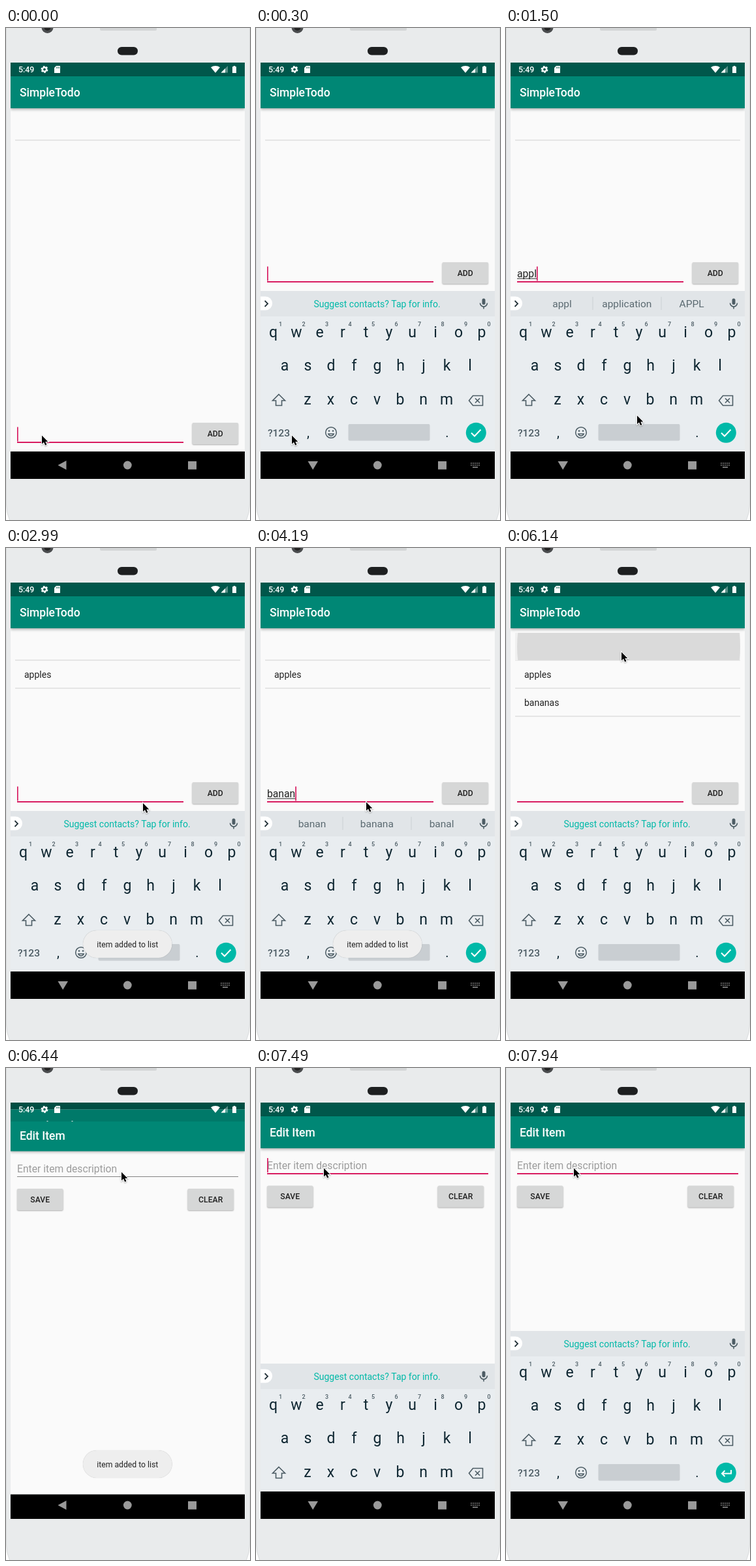
Recreate the animation shown at these times as an HTML page with a canvas. Size 374 by 754 pixels, loop 8000 ms.

```html
<!DOCTYPE html>
<html>
<head>
<meta charset="utf-8">
<style>
html, body { margin: 0; width: 100%; height: 100%; overflow: hidden; background: #fff; }
canvas { display: block; }
</style>
</head>
<body>
<canvas id="stage" width="374" height="754"></canvas>
<script>
const ctx = document.getElementById('stage').getContext('2d');
const LOOP = 8000;
const PINK = '#d81b60', TEAL = '#00b9a8', BAR = '#008775', STATUS = '#00574b';
const INK = '#0e2631', SLATE = '#4c5c64', NAV_GRAY = '#999';
const PROMPT = 'Suggest contacts? Tap for info.';

// Pointer stops: step, x, y
const POINTER = [
  [0, 54, 623], [3, 54, 623], [5, 200, 592.5], [13, 200, 592.5], [16, 330, 376.5], [18, 330, 376.5],
  [20, 209, 389.5], [21, 157, 383], [22, 168, 388], [31, 168, 388], [34, 330, 376.5], [36, 330, 376.5],
  [38, 176, 158], [46, 176, 158], [49, 103, 152], [53, 103, 152]
];
const WORDS = [
  { word: 'apples', start: 7, sent: 18, hints: ['I and', 'app April', 'apple application', 'application APPL', 'apples applet', "apple's apple"] },
  { word: 'bananas', start: 24, sent: 36, hints: ['but be', 'bad back', 'band bank', 'banana band', 'banana banal', 'bananas banana', "banana's bandanas"] }
];
const CARET_OFF = [[5, 6], [15, 17], [21, 23], [34, 35], [39, 42], [53, 53]];

const within = (n, a, b) => n >= a && n <= b;

function rect(x, y, w, h, color, r = 0) {
  ctx.fillStyle = color;
  ctx.beginPath();
  ctx.roundRect(x, y, w, h, r);
  ctx.fill();
}

function disc(x, y, r, color) {
  ctx.fillStyle = color;
  ctx.beginPath();
  ctx.arc(x, y, r, 0, 7);
  ctx.fill();
}

function fill(d, color) {
  ctx.fillStyle = color;
  ctx.fill(new Path2D(d));
}

function line(d, color, width = 1.6, dash = []) {
  ctx.strokeStyle = color;
  ctx.lineWidth = width;
  ctx.setLineDash(dash);
  ctx.stroke(new Path2D(d));
  ctx.setLineDash([]);
}

function text(s, x, y, size, color, align = 'left', weight = 400) {
  ctx.font = `${weight} ${size}px Roboto, sans-serif`;
  ctx.textAlign = align;
  ctx.fillStyle = color;
  ctx.fillText(s, x, y);
}

function clipped(x, y, w, h, paint) {
  ctx.save();
  ctx.beginPath();
  ctx.rect(x, y, w, h);
  ctx.clip();
  paint();
  ctx.restore();
}

function shadowed(blur, dy, paint) {
  ctx.save();
  ctx.shadowColor = 'rgba(0,0,0,.3)';
  ctx.shadowBlur = blur;
  ctx.shadowOffsetY = dy;
  paint();
  ctx.restore();
}

function button(label, x, y, ripple = 0) {
  shadowed(ripple ? 4 : 2, 1, () => rect(x, y, 70.5, 33, '#d6d7d7', 2));
  if (ripple) clipped(x, y, 70.5, 33, () => disc(x + 46, y + 17, ripple, '#c5c6c6'));
  text(label, x + 35.2, y + 20.7, 12.2, '#212121', 'center', 500);
}

function phone() {
  rect(0, 0, 374, 754, '#fff');
  rect(.5, -60, 373, 850, '#e9ebec', 60);
  ctx.strokeStyle = '#d9dbdc';
  ctx.lineWidth = 1;
  ctx.stroke();
  disc(63.5, -1, 9, '#4a4c4e');
  disc(63.5, -1, 5, '#222');
  rect(144, -4, 87, 8, '#d3d5d6', 2);
  rect(171, 29, 31, 12.5, '#1d1f20', 6.2);
}

function page(title) {
  rect(7, 53, 359, 596, '#fafafa');
  rect(7, 53, 359, 21, STATUS);
  shadowed(4, 1.5, () => rect(7, 74, 359, 49, BAR));
  text(title, 21, 105, 17.5, '#fff', 'left', 500);
}

function caret(n, x, top) {
  if (!CARET_OFF.some(([a, b]) => within(n, a, b))) rect(x, top, 1.7, 22, PINK);
}

function listPage(n) {
  page('SimpleTodo');
  rect(14, 171, 345, 1.7, '#e2e2e2');
  WORDS.forEach(({ word, sent }, i) => {
    if (n < sent) return;
    text(word, 28, 199 + i * 43, 14, '#212121');
    rect(14, 214 + i * 43, 345, 1.7, '#e2e2e2');
  });
  if (within(n, 40, 43)) clipped(14, 130, 345, 42, () => {
    rect(14, 130, 345, 42, '#f0f0f0');
    disc(188, 151, [90, 171, 200, 200][n - 40], '#dadada');
  });

  const y = n ? 0 : 246;
  const entry = WORDS.find(w => within(n, w.start, w.sent - 1));
  const typed = entry ? entry.word.slice(0, n - entry.start + 1) : '';
  text(typed, 17, 382 + y, 15.7, '#212121');
  const width = ctx.measureText(typed).width;
  if (typed) rect(17, 383.5 + y, width, 1, '#212121');
  rect(17, 388 + y, 255, 2, PINK);
  caret(n, 17 + width, 365.5 + y);
  const ripple = { 17: 24, 18: 40, 35: 24, 36: 40 }[n];
  button('ADD', 285.5, 359 + y, ripple);
}

function editPage(n) {
  const focused = n >= 50;
  page('Edit Item');
  text('Enter item description', 17, 155, 15.7, '#9c9c9c');
  rect(17, focused ? 161 : 161.5, 339, focused ? 2 : 1, focused ? PINK : '#858585');
  if (focused) caret(n, 17, 138);
  button('SAVE', 17, 180.5);
  button('CLEAR', 278.5, 180.5);
}

function suggestions(n) {
  const entry = WORDS.find(w => within(n, w.start, w.sent - 1));
  if (!entry) return text(PROMPT, 185.5, 427.5, 14, TEAL, 'center');
  const count = Math.min(n - entry.start + 1, entry.word.length);
  const words = [entry.word.slice(0, count), ...entry.hints[count - 1].split(' ')];
  words.forEach((w, i) => text(w, 86 + i * 99.3, 428, 15.5, '#5b6a71', 'center'));
  rect(132.5, 412, 1, 20, '#cbd1d4');
  rect(237.5, 412, 1, 20, '#cbd1d4');
}

function keyRow(letters, x, y) {
  [...letters].forEach((c, i) => text(c, x + i * 35.5, y, 23, INK, 'center'));
}

function keyboard(n) {
  rect(7, 403, 359, 246, '#e9edf0');
  rect(7, 403, 359, 39, '#e1e5e8');
  rect(-4, 411.5, 29, 21, '#fff', 10.5);
  line('M13.5 418l4.5 4.5-4.5 4.5', '#26343b', 1.8);
  suggestions(n);
  ctx.lineCap = 'round';
  line('M349 417v4.5', SLATE, 5);
  ctx.lineCap = 'butt';
  line('M343.5 421.5a5.5 5.5 0 0 0 11 0M349 427v3.5', SLATE);

  keyRow('qwertyuiop', 26.5, 474);
  [...'1234567890'].forEach((c, i) => text(c, 37.5 + i * 35.5, 457, 9, SLATE, 'center', 500));
  keyRow('asdfghjkl', 44, 525);
  keyRow('zxcvbnm', 79, 577);
  line('M35 561.5L44.5 571H39.5V578.5H30.5V571H25.5Z', SLATE);
  line('M326.5 571l6-7.5h15v15h-15zM336 567.5l7 7m0-7l-7 7', SLATE);

  text('?123', 35, 625.5, 15.5, SLATE, 'center', 500);
  text(',', 80, 627, 20, INK, 'center');
  text('.', 293, 627, 20, INK, 'center');
  line('M106.7 620a8.3 8.3 0 0 1 16.6 0a8.3 8.3 0 0 1-16.6 0M110.8 622a4.5 4.5 0 0 0 8.4 0z', SLATE, 1.5);
  disc(112, 617.5, 1.3, SLATE);
  disc(118, 617.5, 1.3, SLATE);
  rect(141.5, 607, 125, 25.5, '#c9ced2', 2);
  disc(337.3, 620.3, 15.5, TEAL);
  line(n < 43 ? 'M330 620.5l5 5 9.5-10' : 'M345 616v5.5h-14m4.5-4.5l-4.5 4.5 4.5 4.5', '#fff', 2);
}

function statusIcons() {
  text('5:49', 19, 68, 12.4, '#fff', 'left', 500);
  const ring = r => `M${59 - r} 63.5a${r} ${r} 0 0 1 ${2 * r} 0a${r} ${r} 0 0 1 ${-2 * r} 0`;
  line(ring(3.1), '#fff', 2.4);
  line(ring(4.6), '#fff', 1.8, [2.6, 2.2]);
  fill('M77 58H83V69H74V61Z', '#fff');
  line('M77.5 59.5v2.5M79.5 59.5v2.5M81.4 59.5v2.5', STATUS, .8);
  fill('M314 60.3a11.5 11.5 0 0 1 14 0L321 68.7Z', '#fff');
  fill('M329.5 68.5H340V58Z', 'rgba(255,255,255,.35)');
  fill('M329.5 68.5H336V62Z', '#fff');
  fill('M347 59.2h1.7v-1.2h2.6v1.2h1.7V69h-6Z', '#fff');
}

function navBar(top, keyboardOpen) {
  rect(7, top, 359, 691 - top, '#000');
  fill(keyboardOpen ? 'M79.5 664H95L87.2 677Z' : 'M92.5 663V677L79.5 670Z', NAV_GRAY);
  disc(186.3, 670, 6.4, NAV_GRAY);
  rect(279, 664, 13, 12.5, NAV_GRAY);
  if (!keyboardOpen) return;
  line('M329 667h14M329 670h14', '#888', 1.7, [1.8, 1.2]);
  line('M332 673.2h8', '#888', 1.7);
}

function toast() {
  shadowed(1, 0, () => rect(118, 586, 136.5, 42, '#eeeeee', 21));
  text('item added to list', 186.3, 612, 12.2, '#222', 'center');
}

function pointer(n) {
  const i = Math.max(1, POINTER.findIndex(p => p[0] >= n));
  const [a, ax, ay] = POINTER[i - 1], [b, bx, by] = POINTER[i];
  const k = (n - a) / (b - a);
  ctx.save();
  ctx.translate(ax + (bx - ax) * k, ay + (by - ay) * k);
  const arrow = 'M1 1.5V14.5L4 11.7L6.2 16.5L8.4 15.5L6.3 10.9H10.3Z';
  shadowed(2, 1, () => line(arrow, '#fff', 2));
  fill(arrow, '#000');
  ctx.restore();
}

function draw(n) {
  const opening = n === 43;
  const keyboardOpen = within(n, 1, 42) || n >= 50;
  phone();
  clipped(7, 53, 359, 638, () => {
    if (n < 43) listPage(n);
    else if (!opening) editPage(n);
    else {
      // The new page slides up over the dimmed old one
      ctx.save();
      ctx.translate(0, -10.5);
      listPage(n);
      ctx.restore();
      rect(7, 53, 359, 638, 'rgba(0,0,0,.1)');
      clipped(7, 82, 359, 609, () => {
        ctx.translate(0, 4.5);
        editPage(n);
      });
    }
    if (keyboardOpen) {
      ctx.save();
      if (n === 1 || n === 50) ctx.translate(0, 50);
      keyboard(n);
      ctx.restore();
    }
    statusIcons();
    navBar(opening ? 653.5 : 649, keyboardOpen);
    if (within(n, 19, 32) || within(n, 42, 46)) toast();
  });
  pointer(n);
}

function tick() {
  const t = performance.now() % LOOP;
  draw(Math.min(53, Math.floor((t + (t >= 2990 ? 10 : 0)) / 150)));
  requestAnimationFrame(tick);
}
tick();
</script>
</body>
</html>
```
